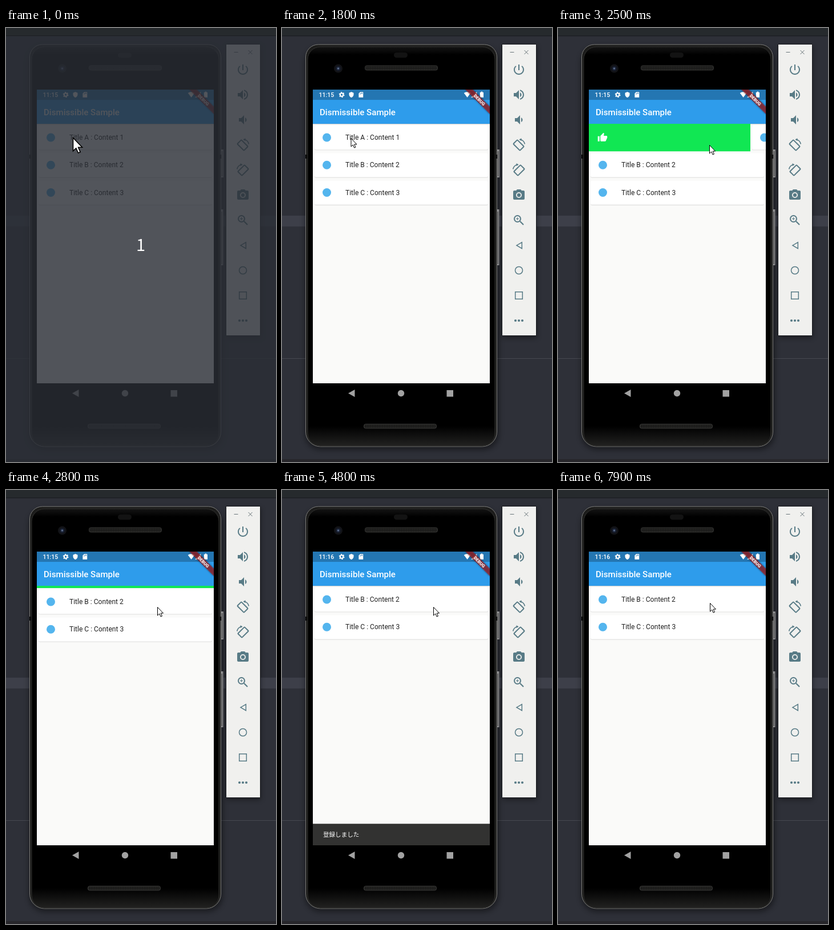
Animation of 473 by 761 pixels, one loop 8000 ms. Source, as an HTML page:

```html
<!DOCTYPE html>
<html lang="en">
<head>
<meta charset="utf-8">
<title>Swipe to dismiss</title>
<style>
html, body { margin: 0; width: 100%; height: 100%; overflow: hidden; background: #2e3038; }
svg { display: block; width: 473px; height: 761px; }
text { font-family: Roboto, sans-serif; white-space: pre; }
.cjk { font-family: "Noto Sans CJK JP", "Noto Sans CJK", sans-serif; }
</style>
</head>
<body>
<svg viewBox="0 0 473 761">
  <defs>
    <clipPath id="screen"><path d="M54 108h310v515H54z"/></clipPath>
    <clipPath id="reveal"><rect id="revealBox" x="54" y="168"/></clipPath>
    <linearGradient id="glass" x2="0" y2="1">
      <stop offset="0" stop-color="#141414"/><stop offset=".02" stop-color="#000"/>
      <stop offset=".95" stop-color="#000"/><stop offset="1" stop-color="#222221"/>
    </linearGradient>
    <pattern id="mesh" width="3" height="3" patternUnits="userSpaceOnUse">
      <path d="M0 0h3v3H0z" fill="#191918"/><path d="M0 0h1.5v1.5H0z" fill="#30302e"/>
    </pattern>
    <filter id="soft" x="-20%" y="-20%" width="140%" height="140%"><feGaussianBlur stdDeviation="5"/></filter>
    <filter id="haze" x="-20%" y="-50%" width="140%" height="200%"><feGaussianBlur stdDeviation="1.5"/></filter>
    <filter id="low" x="-5%" y="-20%" width="110%" height="150%">
      <feDropShadow dx="0" dy=".6" stdDeviation=".6" flood-opacity=".25"/>
    </filter>
    <g id="rotate" fill="none" stroke="#587b86" stroke-width="2">
      <rect x="-8.200" y="-5" width="16.400" height="10" rx="1" transform="translate(11.500 12.500) rotate(45)"/>
      <path d="M13.500 2.500Q20.500 3 22.300 10.500" stroke-width="1.700"/>
      <path d="M12.500 2.500L16.500 .2V5z" fill="#587b86" stroke="none"/>
    </g>
  </defs>

  <!-- desktop -->
  <path d="M0 0h473v761H0z" fill="#2e3038"/>
  <path d="M0 0h473v13H0z" fill="#262a2d"/>
  <path d="M0 13h473v1.500H0z" fill="#1d1f23"/>
  <path d="M0 329h473v19H0z" fill="#3d3f49"/>
  <path d="M0 579h473v1H0z" fill="#474951"/>
  <path d="M0 756h473v5H0z" fill="#27262b"/>

  <!-- phone body -->
  <rect x="40" y="32" width="340" height="708" rx="28" opacity=".4" filter="url(#soft)"/>
  <path d="M377 213h4v49h-4zM376.500 318h4v98h-4z" fill="#8b8b8d"/>
  <path d="M378.500 216v44M378 322v92" stroke="#2b2b2b"/>
  <path d="M41.500 51a22 22 0 0 1 22-22h291a22 22 0 0 1 22 22v657a26 26 0 0 1-26 26h-283a26 26 0 0 1-26-26z" fill="#1c1c1b" stroke="#7d7d7a"/>
  <path d="M41 222h6v7h-6zM371 222h6v7h-6z" fill="#0c0c0c"/>
  <rect x="45" y="33" width="328" height="700" rx="22" fill="url(#glass)" stroke="#30302e"/>
  <rect x="196" y="43" width="24" height="9" rx="4.500" fill="#131313"/>
  <circle cx="98.500" cy="71" r="7.500" fill="#121317"/>
  <circle cx="98.500" cy="71" r="4" fill="#182033"/>
  <circle cx="98.500" cy="71" r="1.800" fill="#5a6a88"/>
  <rect x="145.500" y="66" width="127" height="8" rx="3" fill="url(#mesh)" stroke="#333331"/>
  <rect x="143.500" y="694.500" width="127" height="7.500" rx="3" fill="url(#mesh)" stroke="#3a3a38"/>
  <g fill="#a2a2a2">
    <path d="M116 640.500L127.500 634v13z"/><circle cx="208.500" cy="640.500" r="5.700"/><path d="M288.500 635h11.500v11.500h-11.500z"/>
  </g>

  <!-- app -->
  <g clip-path="url(#screen)">
    <path d="M54 108h310v515H54z" fill="#fafaf9"/>
    <g id="rows"></g>
    <path d="M54 126h310v42H54z" fill="#2d9ceb" filter="url(#low)"/>
    <g clip-path="url(#reveal)">
      <path d="M54 168h310v49H54z" fill="#11e753"/>
      <path id="thumb" fill="#fff" d="M1 21h4V9H1v12zm22-11c0-1.100-.9-2-2-2h-6.310l.95-4.570.03-.32c0-.41-.17-.79-.44-1.060L14.170 1 7.590 7.590C7.220 7.950 7 8.450 7 9v10c0 1.100.9 2 2 2h9c.83 0 1.540-.5 1.840-1.220l3.020-7.050c.09-.23.14-.47.14-.73v-2z"/>
    </g>
    <path d="M54 108h310v18H54z" fill="#2476b2"/>
    <text x="66" y="153" font-size="15.080" font-weight="500" fill="#fff">Dismissible Sample</text>
    <g fill="#fff">
      <text id="clock" x="64.500" y="121" font-size="10.600" font-weight="500"></text>
      <circle cx="104.600" cy="117" r="2.700" fill="none" stroke="#fff" stroke-width="2"/>
      <circle cx="104.600" cy="117" r="4.200" fill="none" stroke="#fff" stroke-width="1.500" stroke-dasharray="2.200"/>
      <path d="M121.500 112l4 1.700v3.300q-.5 3.600-4 5-3.500-1.400-4-5v-3.300z"/>
      <path d="M137 112.200h5.200v9.600h-7.800v-7z"/>
      <path d="M136.500 114.500h1v2h-1zM138.300 113.500h1v2h-1zM140 113.500h1v2h-1z" fill="#2476b2"/>
      <path d="M324.600 121.700L318.700 114q5.900-4 11.800 0z"/>
      <path d="M331 121.800h10.300v-10.300z"/>
      <path d="M348.600 111.500h2.600v1.200h1.800v9.100h-6.200v-9.100h1.800z"/>
    </g>
    <g transform="translate(364 108) rotate(45)">
      <path d="M-30.200 21.100h60.400v9.100h-60.400z" opacity=".5" filter="url(#haze)"/>
      <path d="M-30.200 21.100h60.400v9.100h-60.400z" fill="#b71c1c" fill-opacity=".63"/>
      <text y="28.400" font-size="7.700" font-weight="900" fill="#fff" text-anchor="middle">DEBUG</text>
    </g>
    <g id="snack">
      <path d="M54 585.300h310v38H54z" fill="#323231"/>
      <text class="cjk" x="72" y="608" font-size="10.550" fill="#fff">登録しました</text>
    </g>
  </g>

  <!-- side panel -->
  <rect x="387" y="32" width="59" height="511" opacity=".4" filter="url(#soft)"/>
  <path d="M385.500 28.500h60v511h-60z" fill="#f0f0ee" stroke="#17191d"/>
  <path d="M399.500 42.500h7M424.500 39l7 7m0-7l-7 7" stroke="#687479" fill="none"/>
  <g id="tools" fill="#587b86"></g>
  <g fill="none" stroke="#587b86" stroke-width="1.500">
    <path d="M420.300 375.800v10.800L411 381.200z"/><circle cx="415" cy="425" r="6.500"/><path d="M408.700 462.700h12.600v12.600h-12.600z"/>
  </g>
  <path d="M409 513h0M415 513h0M421 513h0" stroke="#587b86" stroke-width="4.200" stroke-linecap="round"/>

  <g id="intro">
    <path d="M0 14h473v747H0z" fill="#2a2e36" fill-opacity=".81"/>
    <text class="cjk" x="236" y="391" font-size="29" fill="#fff" text-anchor="middle">1</text>
  </g>
  <path id="cursor" d="M0 0V14.500L3.300 11.400 5.600 16.600 7.900 15.600 5.700 10.500H10z" fill="#fff" stroke="#000"/>
</svg>
<script>
const $ = id => document.getElementById(id);
const put = (el, x, y, scale = 1) => el.setAttribute("transform", `translate(${x} ${y}) scale(${scale})`);

const icons = [
  '<path d="M13 3h-2v10h2V3zm4.830 2.170l-1.420 1.420C17.990 7.860 19 9.810 19 12c0 3.870-3.130 7-7 7s-7-3.130-7-7c0-2.190 1.010-4.140 2.580-5.420L6.170 5.170C4.230 6.820 3 9.260 3 12c0 4.970 4.030 9 9 9s9-4.030 9-9c0-2.740-1.230-5.180-3.170-6.830z"/>',
  '<path d="M3 9v6h4l5 5V4L7 9zm13.500 3c0-1.770-1.020-3.290-2.500-4.030v8.050c1.480-.73 2.500-2.250 2.500-4.020zM14 3.230v2.060c2.890.86 5 3.540 5 6.710s-2.110 5.850-5 6.710v2.060c4.010-.91 7-4.490 7-8.770s-2.990-7.860-7-8.770z"/>',
  '<path d="M18.500 12c0-1.770-1.020-3.290-2.500-4.030v8.050c1.480-.73 2.500-2.250 2.500-4.020zM5 9v6h4l5 5V4L9 9z"/>',
  '<use href="#rotate"/>',
  '<use href="#rotate" transform="matrix(-1 0 0 1 24 0)"/>',
  '<path fill-rule="evenodd" d="M9 2L7.170 4H4c-1.100 0-2 .9-2 2v12c0 1.100.9 2 2 2h16c1.100 0 2-.9 2-2V6c0-1.100-.9-2-2-2h-3.170L15 2zm3 15a5 5 0 1 1 0-10 5 5 0 0 1 0 10z"/><circle cx="12" cy="12" r="3.200"/>',
  '<path d="M14 14l6 6" stroke="#587b86" stroke-width="2.100"/><circle cx="9.500" cy="9.500" r="5.500" fill="none" stroke="#587b86" stroke-width="2"/><path d="M7 9h2V7h1v2h2v1h-2v2H9v-2H7z"/>'
];
$("tools").innerHTML = icons.map((icon, i) =>
  `<g transform="translate(403 ${61 + 44 * i})">${icon}</g>`).join("");

const PITCH = 48.25;
$("rows").innerHTML = ["A", "B", "C"].map((letter, i) => `<g>
  <rect x="57" y="171" width="304" height="42.200" rx="2.500" fill="#fff" filter="url(#low)"/>
  <circle cx="78.500" cy="192" r="7.500" fill="#54b5ee"/>
  <text x="111" y="196" font-size="12.060" fill="#212121">Title ${letter} : Content ${i + 1}</text></g>`).join("");
const rows = [...$("rows").children];
put($("thumb"), 69, 183, .75);

// Linear interpolation through [time, value] points.
function track(t, points) {
  let [t0, v0] = points[0];
  for (const [t1, v1] of points) {
    if (t < t1) return t <= t0 ? v0 : v0 + (v1 - v0) * (t - t0) / (t1 - t0);
    [t0, v0] = [t1, v1];
  }
  return v0;
}

const pointerX = [[1700, 118.5], [1800, 121], [1900, 130], [2200, 195.5], [2400, 257], [2500, 265.5], [7300, 265.5], [7900, 266.5]];
const pointerY = [[1900, 193.5], [2200, 194.5], [2500, 205.5], [7300, 205.5], [7900, 198.5]];
const swipe = [[1900, 0], [2000, 12], [2200, 59], [2300, 92], [2400, 170], [2500, 283], [2600, 310]];
const rowHeight = [[2600, PITCH], [2700, 36], [2800, 4], [2900, 4], [3000, 0]];
const snackHeight = [[2900, 0], [3000, 27], [3100, 37.7], [7200, 37.7], [7300, 24], [7400, 3], [7500, 0]];

function draw(now) {
  const t = Math.floor(now % 8000 / 100) * 100;
  const intro = t < 200;
  const shift = track(t, swipe), height = track(t, rowHeight);

  rows.forEach((row, i) => put(row, i ? 0 : shift, i ? height + PITCH * (i - 1) : 0));
  rows[0].style.display = shift < 310 ? "" : "none";
  $("revealBox").setAttribute("width", shift);
  $("revealBox").setAttribute("height", height);
  put($("snack"), 0, 37.7 - track(t, snackHeight));
  $("clock").textContent = t < 4800 ? "11:15" : "11:16";
  $("intro").style.display = intro ? "" : "none";
  put($("cursor"), track(t, pointerX) - intro, track(t, pointerY) - intro, intro ? 1.6 : 1);
}

const start = performance.now();
function tick() {
  draw(performance.now() - start);
  requestAnimationFrame(tick);
}
tick();
</script>
</body>
</html>
```
